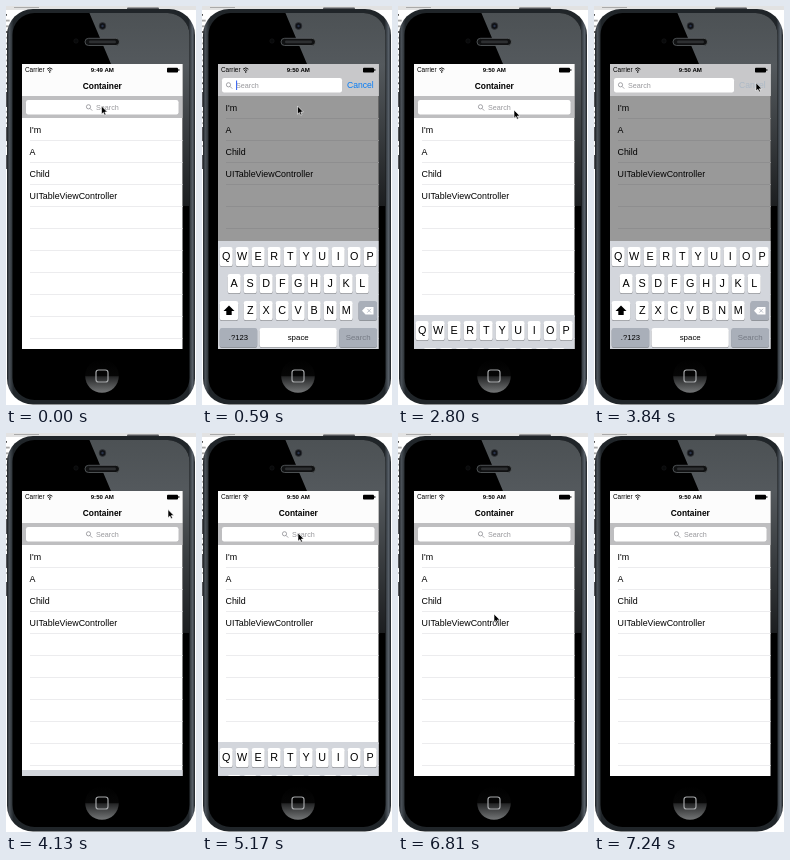
An HTML page for the animation above (8.22 s loop, 190 by 399 pixels).

```html
<!DOCTYPE html>
<html lang="en">
<head>
<meta charset="utf-8">
<title>Search bar in a container</title>
<style>
  html, body { margin: 0; width: 100%; height: 100%; overflow: hidden; background: #fff; }
  svg { display: block; width: 190px; height: 399px; }
  text { font-family: "Liberation Sans", Arial, sans-serif; }
</style>
</head>
<body>
<svg id="stage" viewBox="0 0 190 399" xmlns="http://www.w3.org/2000/svg">
  <defs>
    <clipPath id="screen"><rect x="16" y="58" width="160.5" height="285"/></clipPath>
    <clipPath id="glass"><rect x="6.5" y="7" width="177" height="387" rx="22"/></clipPath>
    <linearGradient id="rim" x2="1">
      <stop offset="0" stop-color="#1b1f23"/><stop offset=".012" stop-color="#4b5259"/>
      <stop offset=".035" stop-color="#202529"/><stop offset=".965" stop-color="#202529"/>
      <stop offset=".988" stop-color="#59616a"/><stop offset="1" stop-color="#1b1f23"/>
    </linearGradient>
    <linearGradient id="gloss" gradientUnits="userSpaceOnUse" x1="0" y1="6" x2="0" y2="200">
      <stop offset="0" stop-color="#4c5154"/><stop offset=".27" stop-color="#54595d"/>
      <stop offset="1" stop-color="#1c1e20"/>
    </linearGradient>
    <linearGradient id="button" x2="0" y2="1">
      <stop offset="0" stop-color="#000"/><stop offset=".5" stop-color="#060606"/>
      <stop offset=".52" stop-color="#242526"/><stop offset="1" stop-color="#747677"/>
    </linearGradient>
  </defs>

  <g id="desk"><rect width="190" height="4" fill="#e2e2e2"/></g>

  <g id="phone">
    <path d="M0 86h3v15h-3zM0 121h3v14h-3zM0 149h3v14h-3z" fill="#55565a"/>
    <rect x="121" y="1.5" width="32" height="4" rx="1" fill="#55565a"/>
    <rect x="1" y="3" width="188" height="395.5" rx="26" fill="url(#rim)"/>
    <g clip-path="url(#glass)">
      <rect width="190" height="399"/>
      <path d="M83 6H184V200H177V58H105Z" fill="url(#gloss)"/>
    </g>
    <circle cx="96.5" cy="20" r="3.4" fill="#101216" stroke="#36393d" stroke-width=".7"/>
    <circle cx="96.5" cy="20" r="1.2" fill="#29334a"/>
    <circle cx="70" cy="35" r="2.2" fill="#08090a" stroke="#1a1b1d" stroke-width=".5"/>
    <rect x="79" y="32.3" width="34.5" height="7.2" rx="3.6" fill="#101112" stroke="#5e6265" stroke-width=".8"/>
    <rect x="83" y="34.5" width="27" height="2.8" rx="1.4" fill="#2d2f31"/>
    <circle cx="96" cy="370" r="16.8" fill="url(#button)"/>
    <rect x="90" y="364" width="12" height="12" rx="2.6" fill="none" stroke="#a4a6a8" stroke-width="1.2"/>
  </g>

  <g clip-path="url(#screen)">
    <rect x="16" y="58" width="161" height="285" fill="#fff"/>
    <g id="table"></g>
    <rect id="dim" x="16" y="68" width="161" height="275"/>
    <rect id="top" x="16" y="58" width="161" height="32" fill="#fcfcfc"/>
    <rect id="bar" x="16" width="161"/>
    <text id="title" x="96.3" y="82.9" font-size="8.4" font-weight="700" text-anchor="middle">Container</text>
    <rect id="field" x="20" height="14.5" rx="2.2" fill="#fff"/>
    <g id="hint">
      <g fill="none" stroke="#8e8e93" stroke-width=".8">
        <circle cx="2.5" cy="-3" r="2.1"/><path d="M4 -1.4L6.2 .8"/>
      </g>
      <text x="10" y="0" font-size="7.2" fill="#98989c">Search</text>
    </g>
    <rect id="caret" x="34" y="74.5" width="1.1" height="9.5" fill="#426bf2"/>
    <text id="cancel" font-size="8.6">Cancel</text>

    <g id="status">
      <text x="19" y="66.4" font-size="6.4">Carrier</text>
      <path d="M41 63.2Q43.7 60.5 46.4 63.2M42.2 64.6Q43.7 63 45.2 64.6" fill="none" stroke="#000" stroke-width=".9"/>
      <circle cx="43.7" cy="66" r=".8"/>
      <text id="clock" x="96.3" y="66.3" font-size="6.1" font-weight="700" text-anchor="middle"></text>
      <rect x="161" y="61.8" width="11" height="4.6" rx=".9"/>
      <rect x="172.4" y="63.1" width=".9" height="2" rx=".4"/>
    </g>
    <g id="keys"><rect x="16" y="235" width="161" height="108" fill="#d3d6dc"/></g>
  </g>

  <path id="pointer" d="M0 0V8.2L1.9 6.5L3.1 9.2L4.5 8.6L3.3 6H5.9Z" stroke="#fff" stroke-width=".6"/>
</svg>
<script>
const LOOP = 8220;
// Bursts of change: first step, last step, number of steps
const bursts = [[0, 0, 1], [300, 1320, 8], [1620, 2510, 7], [2800, 3840, 8],
  [3990, 4720, 6], [5170, 5760, 5], [6060, 6210, 2], [6510, 7240, 6]];
const ticks = bursts.flatMap(([a, b, n]) =>
  Array.from({ length: n }, (_, i) => a + (n > 1 ? Math.floor((b - a) * i / (n - 1) / 10) * 10 : 0)));

// When the search opens and when it closes
const searches = [[300, 1620], [2800, 3990], [5170, 6510]];
// Pointer route: time, x, y
const route = [[0, 95.5, 100], [740, 95.5, 100], [1320, 98, 142], [1910, 98, 142], [2510, 116, 104],
  [3090, 116, 104], [3690, 162, 77], [4130, 162, 76.5], [4270, 162, 76.5], [4720, 96, 100],
  [5310, 96, 100], [5760, 96, 181], [6800, 96, 181], [7240, 96, 260]];

const $ = id => document.getElementById(id);
const set = (id, attrs) => { for (const k in attrs) $(id).setAttribute(k, attrs[k]); };
function add(parent, tag, attrs, label) {
  const el = document.createElementNS("http://www.w3.org/2000/svg", tag);
  for (const k in attrs) el.setAttribute(k, attrs[k]);
  if (label) el.textContent = label;
  $(parent).append(el);
}

function buildDesk() {
  for (let i = 0; i < 24; i++) {
    add("desk", "rect", { x: 0, y: 8 + i * 5.7, width: 1 + (i * 7 % 4) * .9, height: 1.8, fill: i % 3 ? "#aaa" : "#555" });
  }
  add("desk", "rect", { x: 8, y: 1, width: 25, height: 1, fill: "#aaa" });
}

function buildTable() {
  ["I'm", "A", "Child", "UITableViewController"].forEach((label, i) =>
    add("table", "text", { x: 23.5, y: 126.9 + i * 22, "font-size": 8.9 }, label));
  for (let y = 134; y < 370; y += 22) {
    add("table", "rect", { x: 24, y, width: 153, height: 1, fill: "#ececee" });
  }
}

function key(x, y, w, label, size, fill = "#fff", ink = "#000") {
  add("keys", "rect", { x, y: y + .7, width: w, height: 19.3, rx: 2.2, fill: "#898c91" });
  add("keys", "rect", { x, y, width: w, height: 19.3, rx: 2.2, fill });
  if (label) add("keys", "text", { x: x + w / 2, y: y + 9.6 + size * .36, "font-size": size, "text-anchor": "middle", fill: ink }, label);
}

function buildKeys() {
  const gray = "#a9afb9";
  [["QWERTYUIOP", 17.7], ["ASDFGHJKL", 25.7], ["ZXCVBNM", 41.7]].forEach(([row, x], r) =>
    [...row].forEach((c, i) => key(x + i * 16, 241 + r * 27, 13, c, 10.8)));
  key(17.7, 295, 18.5);
  add("keys", "path", { d: "M27 299.5L32.5 305H29.7V309H24.3V305H21.5Z" });
  key(156.5, 295, 18.5, "", 0, gray);
  add("keys", "path", { d: "M160 304.7L163.5 301H171.5V308.4H163.5Z", fill: "#fff" });
  add("keys", "path", { d: "M165.3 302.8L169 306.6M169 302.8L165.3 306.6", stroke: gray, "stroke-width": .8 });
  key(17.7, 322, 37.5, ".?123", 7.7, gray);
  key(57.6, 322, 77.2, "space", 7.9);
  key(137.3, 322, 37.7, "Search", 7.9, gray, "#757a84");
}

// p: how far the search is open; drop: how far the keyboard is lowered
function searchAt(t) {
  const [start, end] = searches.filter(s => s[0] <= t).pop() || [];
  if (start === undefined) return [0, 108];
  const stage = (d, list) => list[d < 100 ? 0 : d < 250 ? 1 : 2];
  return t < end ? stage(t - start, [[0, 74], [.82, 12], [1, 0]])
                 : stage(t - end, [[.69, 57], [0, 102], [0, 108]]);
}

function pointerAt(t) {
  const i = route.findIndex(r => r[0] > t);
  if (i < 0) return route[route.length - 1].slice(1);
  const [a, b] = [route[i - 1], route[i]];
  const k = (t - a[0]) / (b[0] - a[0]);
  return [1, 2].map(n => a[n] + (b[n] - a[n]) * k);
}

function caretAt(t, p) {
  if (p < 1 || (t >= 3840 && t < 3990) || t >= 6210) return 0;
  return t >= 6060 ? .45 : 1;
}

function draw(time) {
  const t = ticks.filter(x => x <= time).pop();
  const [p, drop] = searchAt(t);
  const [x, y] = pointerAt(t);
  const shift = -22 * p;
  const barTop = p === 1 ? 58 : p > 0 ? 69.5 : 90;
  const pressed = t >= 3840 && t < 3990;

  set("table", { transform: `translate(0 ${shift})` });
  set("dim", { opacity: .4 * p });
  set("bar", { y: barTop, height: 112 + shift - barTop, fill: p ? "#c8c8ca" : "#bebec0" });
  set("title", { opacity: p ? 0 : 1 });
  set("field", { y: 94 + shift, width: 152.5 - 32.5 * p });
  set("hint", { transform: `translate(${80 - 56 * p} ${103.8 + shift})` });
  set("caret", { opacity: caretAt(t, p) });
  set("cancel", { x: 177 - 32 * p, y: 104 + shift, fill: pressed ? "#adb9c6" : "#087cf5", opacity: p ? 1 : 0 });
  set("keys", { transform: `translate(0 ${drop})` });
  set("pointer", { transform: `translate(${x} ${y})`, opacity: t < 7240 ? 1 : 0 });
  $("clock").textContent = t < 300 ? "9:49 AM" : "9:50 AM";
}

buildDesk();
buildTable();
buildKeys();
const begin = performance.now();
function frame() {
  draw((performance.now() - begin) % LOOP);
  requestAnimationFrame(frame);
}
frame();
</script>
</body>
</html>
```
